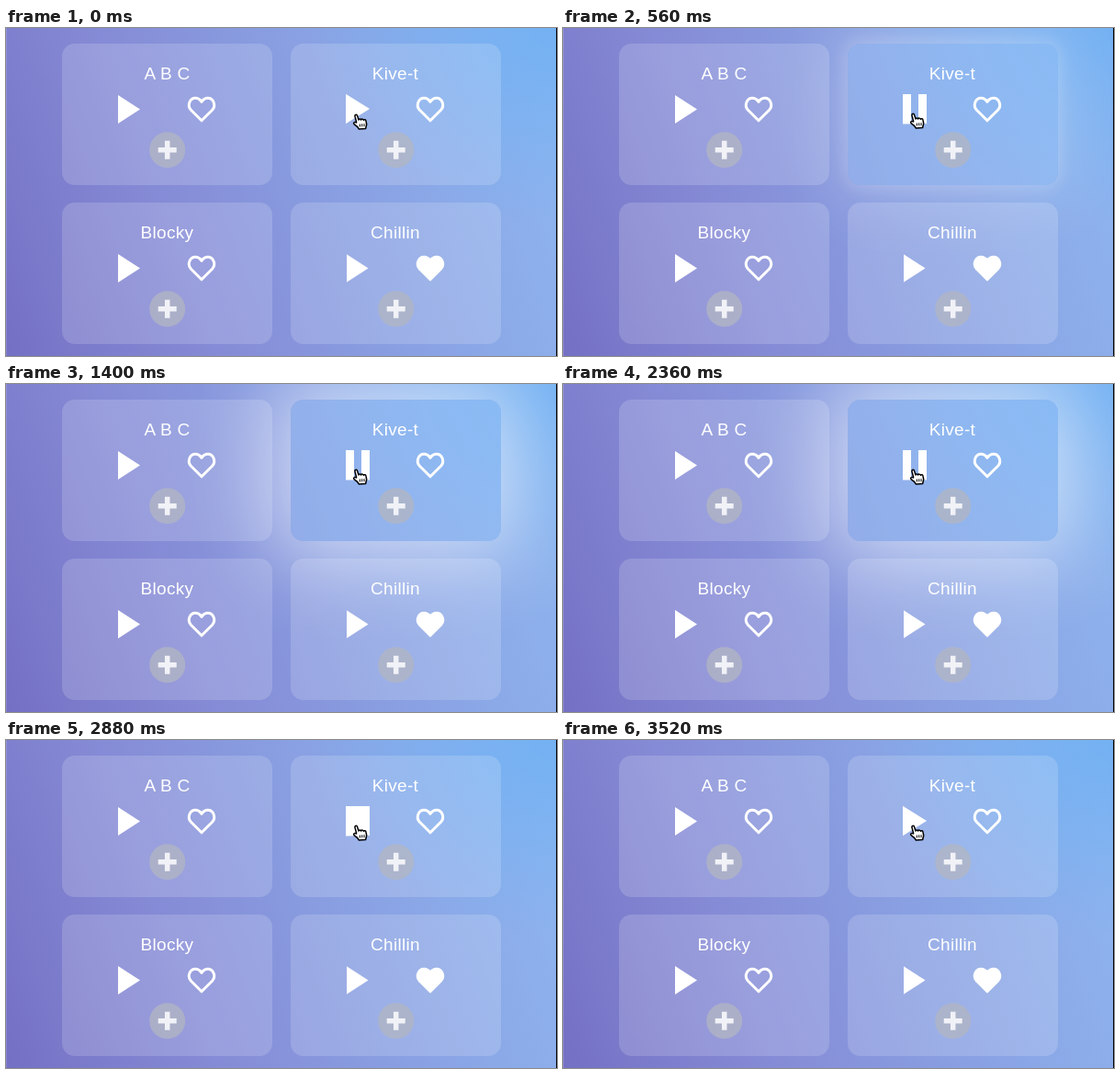
Recreate the animation shown at these times as an HTML page. Size 600x357 px, loop 3.56 s.

```html
<!DOCTYPE html>
<html lang="en">
<head>
<meta charset="utf-8">
<title>Sound cards</title>
<style>
html, body { margin: 0; width: 100%; height: 100%; overflow: hidden; }
#stage {
  position: relative; width: 600px; height: 357px; overflow: hidden;
  background:
    radial-gradient(ellipse 45% 60% at 100% 0, rgba(112, 176, 243, .9), transparent),
    linear-gradient(70deg, #7470c4, #858ad5 30%, #89a0e2 60%, #8fb9f1);
}
#stage::after {
  content: ""; position: absolute; inset: 0;
  border-left: 1px solid rgba(255, 255, 255, .15);
  border-right: 1px solid #060608;
}
.card {
  position: absolute; width: 229px; height: 154px; border-radius: 14px;
  background: rgba(255, 255, 255, .16);
}
.title {
  position: absolute; top: 22px; width: 100%; text-align: center;
  font: 19px/22px "Liberation Sans", Arial, sans-serif;
  letter-spacing: .3px; color: #fff;
}
.card svg { position: absolute; inset: 0; }
.play {
  position: absolute; left: 61px; top: 56px; width: 24px; height: 31px;
  background: #fff; clip-path: polygon(0 0, 100% 50%, 100% 50%, 0 100%);
}
.hover .play { left: 60px; top: 54.5px; width: 26.5px; height: 33px; }
#hand { position: absolute; left: 376.5px; top: 92px; }
</style>
</head>
<body>
<div id="stage"></div>
<script>
const LOOP = 3560;
const stage = document.getElementById('stage');

const HEART = 'M0 12.5 L-11.6 1 C-16 -3.8 -13 -12 -6.8 -12 C-3.6 -12 -1.5 -10.2 0 -8 ' +
  'C1.5 -10.2 3.6 -12 6.8 -12 C13 -12 16 -3.8 11.6 1 Z';

function addCard(x, y, title, { liked = false, hover = false } = {}) {
  const card = document.createElement('div');
  card.className = hover ? 'card hover' : 'card';
  card.style.left = x + 'px';
  card.style.top = y + 'px';
  card.innerHTML = `
    <div class="title">${title}</div>
    <div class="play"></div>
    <svg width="229" height="154">
      <path d="${HEART}" transform="translate(152 71.3)" fill="${liked ? '#fff' : 'none'}"
        stroke="#fff" stroke-width="3" stroke-linejoin="round"/>
      <circle cx="114.7" cy="115.7" r="19.5" fill="#b2b6c2" fill-opacity=".75"/>
      <path d="M104.7 115.7h20M114.7 105.7v20" stroke="#f1f2f7" stroke-width="5.5"/>
    </svg>`;
  stage.append(card);
  return card;
}

addCard(61, 17, 'A B C');
const active = addCard(309.5, 17, 'Kive-t', { hover: true });
addCard(61, 190, 'Blocky');
addCard(309.5, 190, 'Chillin', { liked: true });

stage.insertAdjacentHTML('beforeend', `
  <svg id="hand" width="18" height="19">
    <path d="M4.5 9 L3 3.4 C2.4 1.2 5 .6 5.6 2.6 L7 7 C7.4 5.6 9.2 5.6 9.6 7
      C10.2 5.7 12 5.9 12.3 7.2 C13.2 6.2 14.8 6.8 15 8.2 L15.7 12 L14.6 16.5
      L7.4 17 L5.8 14.7 L2 11.6 C.9 10.2 2.4 8.6 4.5 10 Z"
      fill="#fff" stroke="#000" stroke-width="1.5" stroke-linejoin="round"/>
    <path d="M8.4 11.5v3M10.7 11.3v3M13 11.2v3" stroke="#000"/>
  </svg>`);

// Each step is [time in ms, properties, easing towards the next step].
function loop(element, steps) {
  element.animate(
    steps.map(([at, props, easing = 'linear']) => ({ offset: at / LOOP, easing, ...props })),
    { duration: LOOP, iterations: Infinity });
}

const triangle = { clipPath: 'polygon(0 0, 100% 50%, 100% 50%, 0 100%)' };
const block = { clipPath: 'polygon(0 0, 100% 0, 100% 100%, 0 100%)' };
const filled = { backgroundImage: 'none', backgroundColor: '#fff' };
const bars = {
  backgroundColor: 'transparent',
  backgroundImage: 'linear-gradient(90deg, #fff 34%, transparent 34% 65%, #fff 65%)'
};

const button = active.querySelector('.play');
loop(button, [
  [0, triangle], [120, triangle, 'ease'], [640, block],
  [2860, block, 'ease'], [3400, triangle], [LOOP, triangle]
]);
loop(button, [
  [0, filled, 'step-end'], [120, bars, 'step-end'],
  [2880, filled, 'step-end'], [LOOP, filled]
]);

const glow = (blur, spread, alpha, edge, tint) => ({
  boxShadow: `0 0 ${blur}px ${spread}px rgba(255,255,255,${alpha}), ` +
    `0 0 16px 5px rgba(255,255,255,${edge})`,
  backgroundColor: tint
});
const pale = 'rgba(255,255,255,.16)';
const blue = 'rgba(160,200,248,.4)';
const off = glow(0, 0, 0, 0, pale);
const full = glow(88, 20, .6, 0, blue);
loop(active, [
  [0, off], [120, off, 'ease-in'],
  [560, glow(76, 14, .22, .16, blue)],
  [840, glow(84, 18, .56, .02, blue), 'ease-out'],
  [1200, full], [2880, full, 'step-end'],
  [2880, off], [LOOP, off]
]);

loop(document.getElementById('hand'), [
  [0, { transform: 'translateY(1px)' }, 'step-end'],
  [120, { transform: 'none' }, 'step-end'],
  [LOOP, { transform: 'none' }]
]);
</script>
</body>
</html>
```
